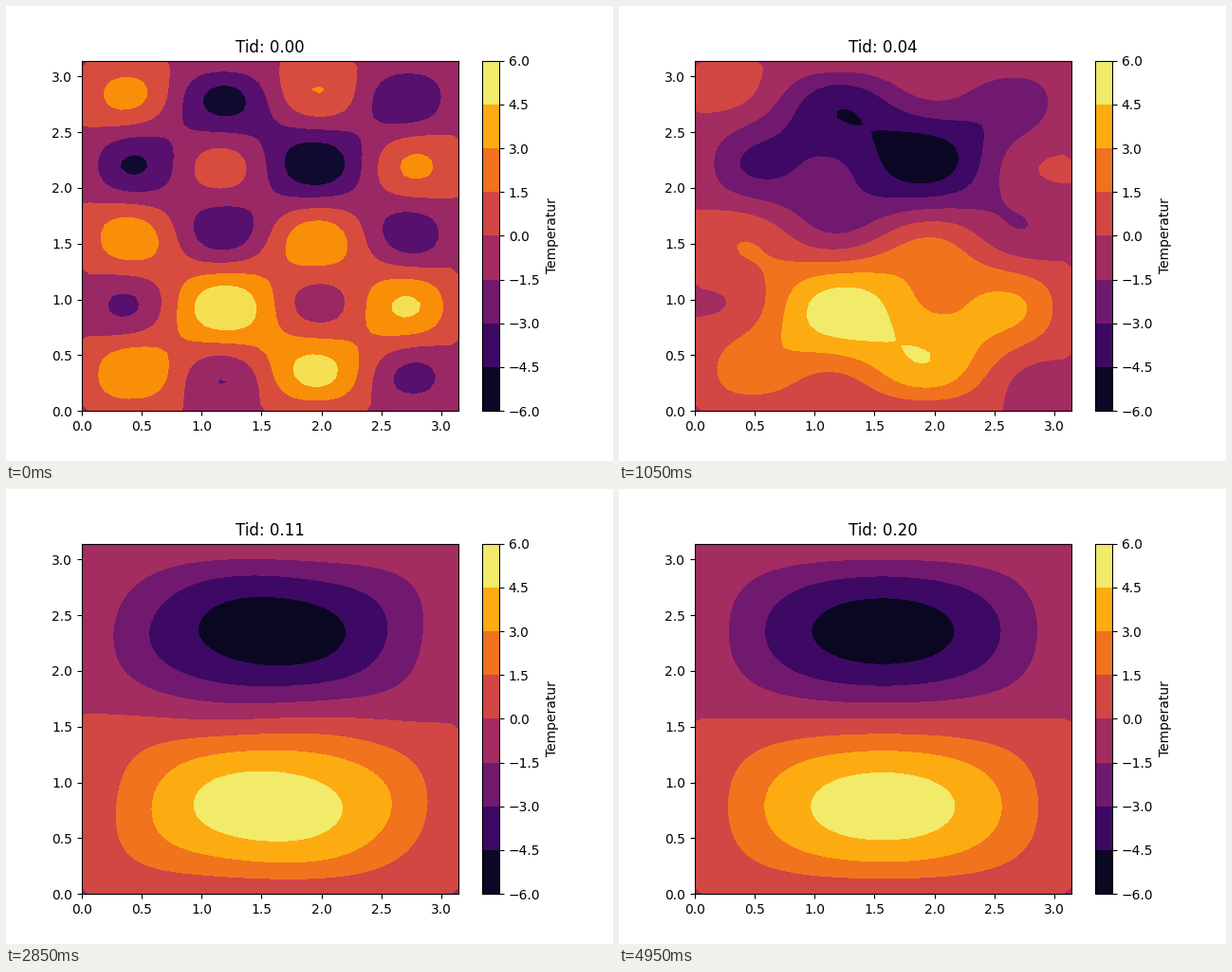
Recreate the animation shown at these times as a matplotlib script. Size 640 by 480 pixels, loop 5000 ms.

```python
import numpy as np
import matplotlib.pyplot as plt
from matplotlib.animation import FuncAnimation

FRAMES = 100
INTERVAL = 50
DT = 0.002
POINTS = 50
CMAP = "inferno"

# (amplitude, wave number in x, wave number in y)
MODES = [(1.957, 1, 2), (2.54, 4, 5)]

axis = np.linspace(0, np.pi, POINTS)
X, Y = np.meshgrid(axis, axis)


def temperature(t):
    """Heat equation on a square whose edges are held at zero."""
    u = sum(a * np.exp(-(n**2 + m**2) * t) * np.sin(n * X) * np.sin(m * Y)
            for a, n, m in MODES)
    return np.round(u, 12)  # keeps the edges at exactly zero


fig, ax = plt.subplots(figsize=(6.4, 4.8), dpi=100)
scale = ax.contourf(X, Y, temperature(0), levels=np.arange(-6, 6.1, 1.5), cmap=CMAP)
fig.colorbar(scale, ax=ax, label="Temperatur")


def update(i):
    t = i * DT
    ax.clear()
    ax.contourf(X, Y, temperature(t), cmap=CMAP)
    ax.set_title(f"Tid: {t:.2f}")


anim = FuncAnimation(fig, update, frames=FRAMES, interval=INTERVAL,
                     init_func=lambda: update(0), repeat=True, repeat_delay=0)
plt.show()
```
